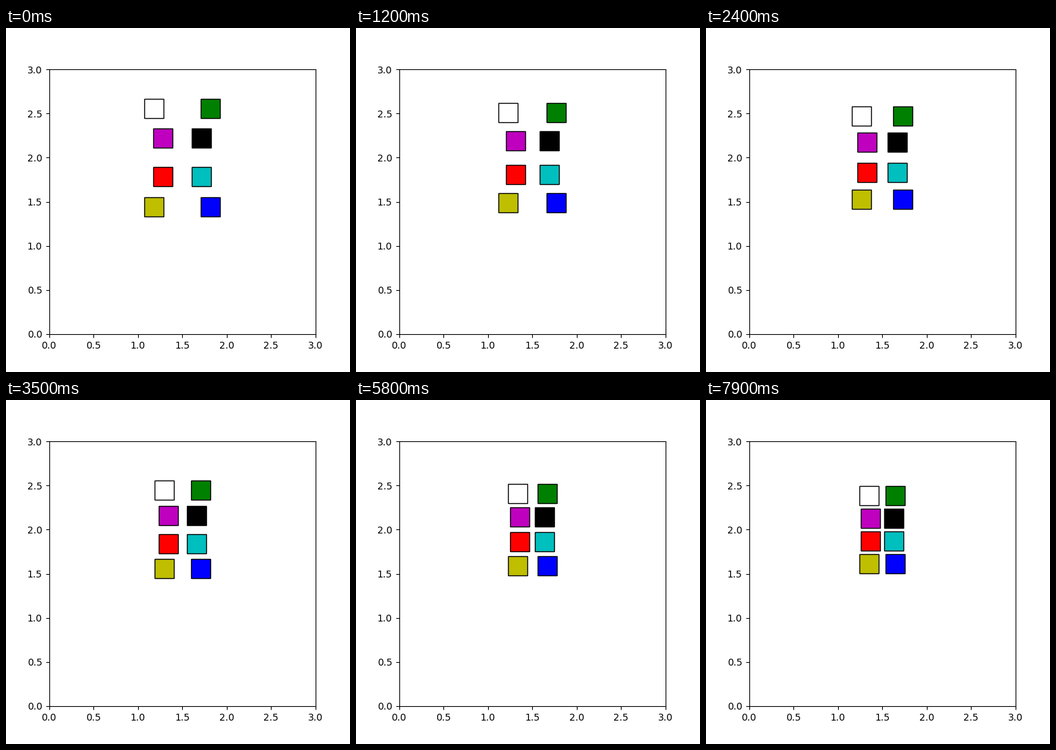
A matplotlib script that plays this animation: 500 px wide and 500 px high, repeating every 8000 ms.

```python
import numpy as np
import matplotlib.pyplot as plt
from matplotlib.animation import FuncAnimation

FRAMES, INTERVAL = 80, 100
CENTER = np.array([1.5, 2.0])

# Distance from the centre along one axis: rest + gap * exp(-rate * frame)
OUTER_X = (0.114, 0.2053, 0.0232)
OUTER_Y = (0.3523, 0.2073, 0.02305)
INNER = (0.116, 0.1012, 0.0245)

# colour, x side, y side, x motion, y motion
AGENTS = [
    ("r", -1, -1, INNER, INNER),
    ("b", 1, -1, OUTER_X, OUTER_Y),
    ("g", 1, 1, OUTER_X, OUTER_Y),
    ("k", 1, 1, INNER, INNER),
    ("w", -1, 1, OUTER_X, OUTER_Y),
    ("y", -1, -1, OUTER_X, OUTER_Y),
    ("c", 1, -1, INNER, INNER),
    ("m", -1, 1, INNER, INNER),
]


def offset(motion, i):
    rest, gap, rate = motion
    return rest + gap * np.exp(-rate * i)


fig = plt.figure(figsize=(5, 5), dpi=100)
ax = fig.add_subplot(xlim=(0, 3), ylim=(0, 3))
markers = [
    ax.plot([], [], "s", color=agent[0], markersize=20,
            markeredgecolor="k", markeredgewidth=1)[0]
    for agent in AGENTS
]


def update(i):
    for marker, (_, sx, sy, mx, my) in zip(markers, AGENTS):
        x, y = CENTER + (sx * offset(mx, i), sy * offset(my, i))
        marker.set_data([x], [y])
    return markers


anim = FuncAnimation(fig, update, frames=FRAMES, interval=INTERVAL,
                     repeat=True, repeat_delay=0)
plt.show()
```
